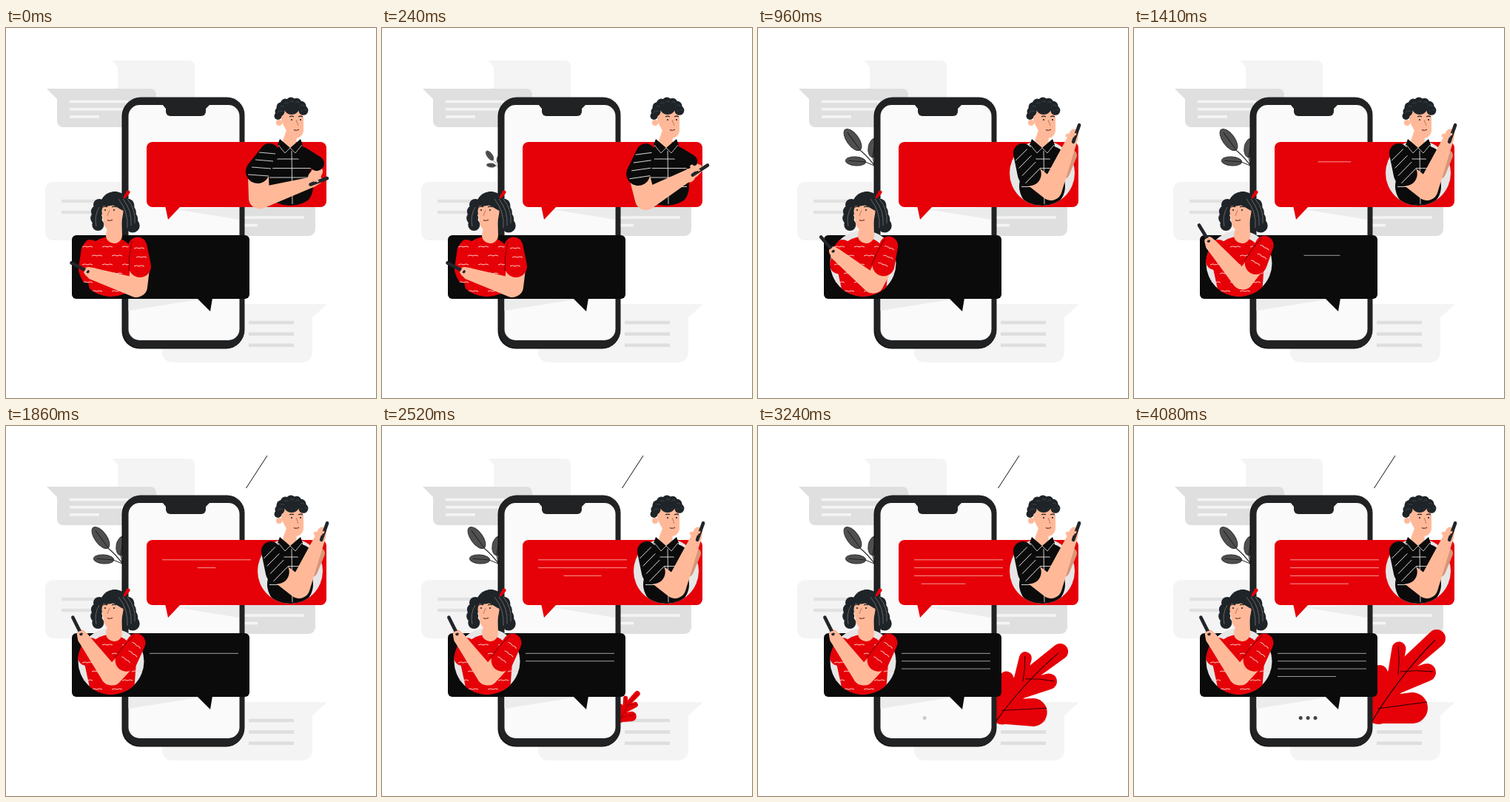
Animation, 500 px wide and 500 px high, one loop 4830 ms. Source, as an HTML page with a canvas:

```html
<!DOCTYPE html>
<html lang="en">
<head>
<meta charset="utf-8">
<title>Chat</title>
<style>
html, body { margin: 0; width: 100%; height: 100%; overflow: hidden; background: #fff; }
canvas { display: block; width: 500px; height: 500px; }
</style>
</head>
<body>
<canvas id="stage" width="500" height="500"></canvas>
<script>
const c = document.getElementById('stage').getContext('2d');
const LOOP = 4830, STEP = 30, TAU = Math.PI * 2;
const RED = '#e60008', BLACK = '#0b0b0b', DARK = '#212223', INK = '#1f2428';
const SKIN = '#ffb999', SHADE = '#d9957a', PALE = '#f4f4f4', GRAY = '#dfdfdf', RING = '#e6e6e6';

const mix = (a, b, k) => a + (b - a) * k;
const span = (t, from, to) => Math.max(0, Math.min(1, (t - from) / (to - from)));

function box(x0, y0, x1, y1, r, fill) {
  c.beginPath();
  c.roundRect(x0, y0, x1 - x0, y1 - y0, r);
  c.fillStyle = fill;
  c.fill();
}

function poly(fill, ...p) {
  c.beginPath();
  for (let i = 0; i < p.length; i += 2) c.lineTo(p[i], p[i + 1]);
  c.fillStyle = fill;
  c.fill();
}

function disc(x, y, r, fill) {
  c.beginPath();
  c.arc(x, y, r, 0, TAU);
  c.fillStyle = fill;
  c.fill();
}

// Hull of two circles: limbs, heads and leaf lobes.
function taper(fill, x0, y0, r0, x1, y1, r1) {
  const a = Math.atan2(y1 - y0, x1 - x0);
  const b = Math.acos((r0 - r1) / Math.hypot(x1 - x0, y1 - y0));
  c.beginPath();
  c.arc(x0, y0, r0, a + b, a - b + TAU);
  c.arc(x1, y1, r1, a - b, a + b);
  c.fillStyle = fill;
  c.fill();
}

// Stroke from one point to another, bowed sideways.
function curve(color, w, x0, y0, x1, y1, bow = 0) {
  c.beginPath();
  c.moveTo(x0, y0);
  c.quadraticCurveTo((x0 + x1) / 2 - (y1 - y0) * bow, (y0 + y1) / 2 + (x1 - x0) * bow, x1, y1);
  c.strokeStyle = color;
  c.lineWidth = w;
  c.stroke();
}

function rows(color, w, x0, x1, y, gap, n, short = x1) {
  for (let i = 0; i < n; i++) curve(color, w, x0, y + i * gap, i === n - 1 ? short : x1, y + i * gap);
}

function turned(x, y, deg, scale, draw) {
  c.save();
  c.translate(x, y);
  c.rotate(deg * Math.PI / 180);
  c.scale(scale, scale);
  c.translate(-x, -y);
  draw();
  c.restore();
}

function inDisc(x, y, r, draw) {
  c.save();
  c.beginPath();
  c.arc(x, y, r, 0, TAU);
  c.clip();
  draw();
  c.restore();
}

function backdrop() {
  c.fillStyle = '#fff';
  c.fillRect(0, 0, 500, 500);
  box(151, 44, 255, 134, 8, PALE);
  poly(PALE, 144, 44, 165, 44, 165, 60, 151, 53);
  box(69, 82, 203, 134, 8, GRAY);
  poly(GRAY, 55, 82, 80, 82, 80, 100, 69, 96);
  rows(PALE, 3.6, 86, 165, 99.5, 10.2, 3, 126);
  box(53, 208, 200, 287, 11, PALE);
  rows('#e2e2e2', 4.5, 75, 165, 234, 15, 2);
  box(250, 225, 418, 281, 9, GRAY);
  rows(PALE, 3.6, 310, 403, 256, 10.5, 2, 340);
  box(211, 373, 414, 452, 14, PALE);
  poly(PALE, 395, 373, 434, 373, 414, 391, 400, 395);
  rows('#dedede', 4.5, 328, 389, 398, 15.4, 3);
}

function sprigLeaf(x, y, long, wide, deg) {
  turned(x, y, deg, 1, () => {
    c.beginPath();
    c.ellipse(x, y, long, wide, 0, 0, TAU);
    c.fillStyle = '#505050';
    c.fill();
    c.strokeStyle = '#333';
    c.lineWidth = 1;
    c.stroke();
    curve('#222', 1, x - long * .7, y, x + long, y);
  });
}

function sprig(t) {
  const grow = 1 - (1 - span(t, 0, 930)) ** 2;
  turned(160, 190, 0, grow, () => {
    sprigLeaf(128, 151, 17, 8, 54);
    sprigLeaf(132, 180, 13.5, 6, 4);
    sprigLeaf(157, 162, 13, 8, 100);
    curve('#222', 1.1, 138, 165, 159, 188, -.06);
    curve('#222', 1, 145, 181, 157, 186);
    curve('#222', 1, 155, 174, 157, 186);
  });
}

function oakLeaf(t) {
  const u = span(t, 2130, 3360);
  const sway = 9 * Math.sin((u - .43) / .57 * Math.PI);
  turned(320, 400, sway, u, () => {
    taper(RED, 330, 385, 18, 354, 340, 14);
    taper(RED, 352, 338, 10, 409, 287, 12);
    taper(RED, 352, 335, 9, 358, 301, 9.5);
    taper(RED, 350, 350, 14, 396, 333, 12);
    taper(RED, 328, 375, 16, 332, 334, 11);
    taper(RED, 330, 384, 18, 376, 381, 21);
    curve('#250000', 1.1, 321, 400, 407, 289, -.06);
    curve('#250000', 1, 329, 382, 396, 373);
    curve('#250000', 1, 360, 332, 404, 332, -.06);
    curve('#250000', 1, 357, 336, 357, 298, .06);
  });
}

function phone() {
  box(156.5, 95, 321.5, 433.5, 24, '#171717');
  box(158, 93.5, 322.5, 432, 24, DARK);
  box(165.5, 104, 315.5, 422, 15, '#fafafa');
  poly('#ececec', 230, 245, 315, 242, 315, 259);
  poly('#ececec', 165.5, 366, 266, 366, 165.5, 382);
  box(216, 98, 270, 119, 6, DARK);
  poly(DARK, 211, 103, 276, 103, 270, 109, 216, 109);
}

function textLines(t, x, y, gap, start, every) {
  for (let i = 0; i < 4; i++) {
    const full = i === 3 ? 39.5 : 60;
    const half = full * span(t, start + i * every, start + i * every + 540);
    curve('rgba(255,255,255,.6)', 1, x + full - half, y + i * gap, x + full + half, y + i * gap);
  }
}

function bubbles(t) {
  box(190, 154, 433, 242, 8, RED);
  poly(RED, 215, 240, 219, 259, 236, 241);
  box(89, 280, 329, 366, 6, BLACK);
  poly(BLACK, 258, 365, 276, 383, 279, 365);
  textLines(t, 211, 180.8, 10.8, 1210, 540);
  textLines(t, 194, 307.3, 10.4, 1190, 690);
  for (let i = 0; i < 3; i++) {
    c.globalAlpha = span(t, 3150 + i * 285, 3510 + i * 285);
    disc(225.2 + i * 9.9, 394.6, 2.5, '#444');
  }
  c.globalAlpha = 1;
}

function device(x0, y0, x1, y1) {
  c.lineCap = 'round';
  curve('#22252a', 4.6, x0, y0, x1, y1);
  c.lineCap = 'butt';
}

function face(x, y, gap, side) {
  for (const ex of [x, x + gap]) {
    curve(INK, 1.1, ex - 3, y - 4, ex + 3, y - 4, -.3);
    disc(ex, y, 1.1, INK);
  }
  const nose = x + gap / 2;
  curve('#b96d52', .9, nose, y, nose + side * 3, y + 8);
  curve('#6b2c26', 1.1, nose - 3, y + 13.5, nose + 4, y + 13, .3);
}

function man(t) {
  const k = span(t, 0, 960), seam = '#e4e4e4';
  disc(384, 196, 44 * span(t, 0, 560), RING);
  inDisc(384, 196, 44, () => {
    taper(BLACK, 385, 179, 25, 384, 214, 31);
    rows(seam, .9, 356, 412, 177, 12.5, 4);
    curve(seam, .9, 386, 166, 387, 238);
  });
  taper(k < .3 ? SKIN : SHADE, mix(416, 413, k), mix(202, 196, k), 8, mix(421, 424, k), mix(194, 172, k), 7);
  taper(BLACK, 401, 170, 9, mix(420, 405, k), mix(183, 174, k), 10);

  taper(SKIN, 386, 142, 8, 383, 154, 9);
  taper(SKIN, 387, 122, 15, 391, 138, 11);
  disc(386, 106, 11, INK);
  disc(367.5, 119, 5, INK);
  for (let i = 0; i < 7; i++) {
    const a = Math.PI * (.04 + i * .16);
    const x = 386 + 16 * Math.cos(a), y = 113 - 13 * Math.sin(a);
    disc(x, y, 6.5, INK);
    curve('#4b555d', .7, x - 3, y + 2, x + 4, y, -.6);
  }
  disc(369, 128, 4, SKIN);
  face(386, 124, 12, 1);
  for (const s of [-1, 1]) {
    poly(BLACK, 384, 162, 384 + s * 14, 150, 384 + s * 17, 158, 384 + s * 7, 170);
    curve(seam, .8, 384, 162, 384 + s * 7, 169);
    curve(seam, .8, 384 + s * 7, 169, 384 + s * 16, 158);
  }

  turned(357, 167, -50 * k, 1, () => {
    taper(SKIN, 341, 200, 14, 342, 230, 14);
    taper(SKIN, 343, 230, 14.5, 414, 208, 7);
    taper(SKIN, 414, 208, 7, 421, 205, 6);
    taper(SKIN, 415, 205, 4, 413, 200, 2.5);
    taper(BLACK, 356, 169, 13, 340, 194, 16);
    for (let i = 0; i < 4; i++) curve(seam, .9, 342 - i * 5, 168 + i * 10, 364 - i * 3, 170 + i * 10);
    device(411.5, 211.5, 434, 203);
    curve(SKIN, 3, 416, 207, 422, 208, -.5);
  });
}

function wave(x, y) {
  curve('#ffc9c4', 1, x - 7, y, x, y, -.3);
  curve('#ffc9c4', 1, x, y, x + 7, y, -.3);
}

function woman(t) {
  const moved = t < 960 ? t : Math.max(960, t - 270);
  const k = span(moved, 570, 1230);
  disc(142, 318, 44.5 * span(t, 540, 870), RING);
  inDisc(142, 318, 45, () => {
    taper(RED, 141, 317, 35, 143, 345, 31);
    taper(RED, 114, 298, 12, 109, mix(332, 312, k), 12);
    for (let i = 0; i < 18; i++) {
      const row = Math.floor(i / 3);
      wave(110 + i % 3 * 27 + row % 2 * 13, 296 + row * 12);
    }
  });

  disc(147, 241, 20, INK);
  for (let i = 0; i < 4; i++) {
    const y = 239 + i * 9;
    disc(126 - 4 * Math.sin(i * .9), y, 8, INK);
    disc(164 + i * 2.4, y + 1, 9.5, INK);
  }
  taper(SKIN, 147, 266, 9, 146, 280, 11);
  taper(SKIN, 144, 248, 14.5, 144, 262, 12);
  taper(INK, 135, 235, 6, 147, 230, 9);
  taper(INK, 147, 230, 9, 160, 240, 7);
  for (let i = 0; i < 3; i++) curve('#777', .8, 152 + i * 6, 231, 164 + i * 5, 270 - i * 3, -.2);
  curve('#777', .8, 126, 242, 122, 268, .2);
  taper(RED, 160, 229, 1.5, 165, 222, 2.5);
  face(134, 246, 12, -1);

  turned(180, 291, 36 * k, 1, () => {
    taper(SKIN, 181, 325, 13, 178, 350, 13);
    taper(SKIN, 176, 351, 13, 117, 332, 8);
    taper(SKIN, 117, 332, 8, 111, 329, 6);
    taper(RED, 178, 295, 12.5, 181, 322, 15);
    curve('#560003', .8, 170, 288, 166, 328, .06);
    for (let i = 0; i < 3; i++) wave(180 + i % 2 * 3, 298 + i * 12);
    device(88.5, 317.5, 110.5, 329);
    curve(SKIN, 3, 107, 331, 113, 325, -.4);
  });
}

function draw(t) {
  backdrop();
  sprig(t);
  oakLeaf(t);
  if (t >= 1770) curve('#111', 1, 324.5, 84, 353, 40);
  phone();
  bubbles(t);
  man(t);
  woman(t);
}

const start = performance.now();
function tick() {
  const t = (performance.now() - start) % LOOP;
  draw(Math.floor(t / STEP) * STEP);
  requestAnimationFrame(tick);
}
tick();
</script>
</body>
</html>
```
